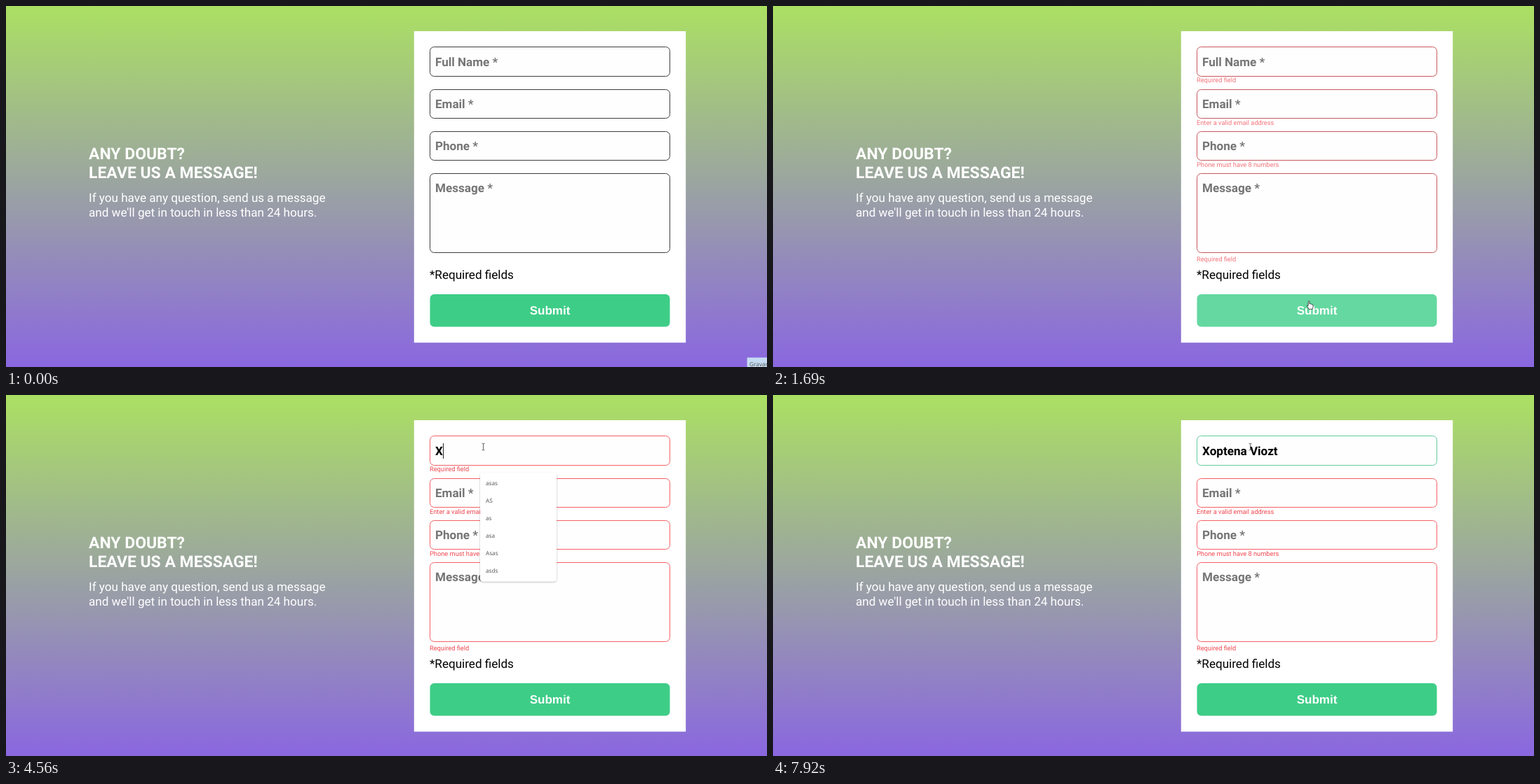
Recreate the animation shown at these times as an HTML page. Size 1085 by 516 pixels, loop 7990 ms.

```html
<!DOCTYPE html>
<html lang="en">
<head>
<meta charset="utf-8">
<title>Contact form</title>
<style>
  html, body { margin: 0; width: 100%; height: 100%; overflow: hidden; }
  svg { display: block; width: 100vw; height: 100vh; }
  text { font-family: Roboto, sans-serif; font-size: 17.08px; white-space: pre; text-rendering: geometricPrecision; }
  .bold { font-weight: 700; }
  .title { font-weight: 700; font-size: 22.95px; fill: #fff; }
  .lead { fill: #fff; }
  .hint { font-weight: 700; fill: #757575; }
  .error { font-size: 9.25px; fill: #f0464f; }
  .submit { font: 700 17px "Liberation Sans", Arial, sans-serif; fill: #fff; text-anchor: middle; }
  .option { font: 8.2px "Open Sans", sans-serif; fill: #505050; }
  .tip { font: 8.3px "Open Sans", sans-serif; fill: #555; }
</style>
</head>
<body>
<svg id="stage" viewBox="0 0 1085 516" preserveAspectRatio="none">
  <defs>
    <linearGradient id="sky" x2="0" y2="1">
      <stop stop-color="#abe063"/>
      <stop offset="1" stop-color="#8a67e0"/>
    </linearGradient>
    <filter id="soft" x="-10%" y="-10%" width="120%" height="120%">
      <feDropShadow dx="0" dy="1" stdDeviation="1.2" flood-opacity=".3"/>
    </filter>
  </defs>
  <rect width="1085" height="516" fill="url(#sky)"/>
  <rect x="581.8" y="36" width="387.4" height="445.2" fill="#fff"/>
</svg>
<script>
const LOOP = 7990;
const NAME = 'Xoptena Viozt';
const KEY_TIMES = [4560, 4950, 5150, 5340, 5550, 5870, 6070, 6200, 6530, 6800, 6930, 7070, 7400];
const DARK = [62, 62, 68], RED = [245, 96, 102], GREEN = [98, 203, 158];
const BUTTON = [62, 205, 135], HOVER = [100, 216, 160];

// Pointer hot spot: time, x, y
const PATH = [
  [670, 988, 512], [800, 925, 480], [930, 850, 457], [1090, 801, 448], [1130, 797.5, 443.5],
  [1540, 797.5, 443.5], [1700, 762, 420], [1800, 733, 405], [1950, 691, 384], [2280, 690, 372],
  [2340, 686, 355], [2550, 655, 243], [2750, 684, 183], [3120, 682, 106], [3350, 680.5, 74]
];

const stage = document.getElementById('stage');

function add(tag, attrs, parent = stage) {
  const el = document.createElementNS('http://www.w3.org/2000/svg', tag);
  for (const key in attrs) el.setAttribute(key, attrs[key]);
  parent.append(el);
  return el;
}

function label(text, x, y, cls, parent) {
  const el = add('text', { x, y, class: cls }, parent);
  el.textContent = text;
  return el;
}

const set = (el, key, value) => el.setAttribute(key, value);
const show = (el, on) => set(el, 'opacity', Number(on));
const ramp = (t, from, to) => Math.min(1, Math.max(0, (t - from) / (to - from)));
const mix = (a, b, k) => `rgb(${a.map((v, i) => Math.round(v + (b[i] - v) * k))})`;

label('ANY DOUBT?', 118, 219, 'title');
label('LEAVE US A MESSAGE!', 118, 246, 'title');
label('If you have any question, send us a message', 118, 280, 'lead');
label("and we'll get in touch in less than 24 hours.", 118, 301.3, 'lead');

const fields = [
  ['Full Name *', 58.5, 42, 'Required field', 109.3],
  ['Email *', 119.5, 41, 'Enter a valid email address', 170],
  ['Phone *', 179.5, 41, 'Phone must have 8 numbers', 229.5],
  ['Message *', 239.5, 113, 'Required field', 364.5]
].map(([hint, y, height, error, errorY], i) => ({
  y, height,
  box: add('rect', { x: 604.5, y, width: 342, height, rx: 6, fill: '#fefefe' }),
  hint: label(hint, 612, 86 + i * 60, 'hint'),
  error: label(error, 604, errorY, 'error')
}));

label('*Required fields', 604, 390, '');
const button = add('rect', { x: 604.5, y: 412, width: 342, height: 46.5, rx: 6 });
label('Submit', 775.5, 441, 'submit');

const typed = label('', 612, 86, 'bold');
const caret = add('rect', { y: 69, width: 1, height: 22, fill: '#222' });

const menu = add('g', {});
add('rect', { x: 676, y: 111, width: 109, height: 155.5, rx: 4, fill: '#fff', filter: 'url(#soft)' }, menu);
['asas', 'AS', 'as', 'asa', 'Asas', 'asds'].forEach((word, i) =>
  label(word, 684, 128.5 + i * 25.1, 'option', menu));

const glow = add('circle', { r: 8.6, fill: '#f8f23c' });
const pointer = add('g', {});
const outline = { fill: '#fff', stroke: '#222', 'stroke-width': .8, 'stroke-linejoin': 'round' };
const shapes = {
  arrow: add('path', { d: 'M0 0V11L2.6 8.7L4.3 12.3L6 11.5L4.4 8H8Z', ...outline }, pointer),
  hand: add('path', {
    d: 'M-.9 .8Q0 -.8 .9 .8V4.4Q2 3.8 2.8 4.8Q3.8 4.4 4.4 5.3Q6 5 6 6.6V9Q6 10.4 5 12H0Q-1 9.7 -2.8 7.6Q-3 6 -.9 7.2Z',
    ...outline
  }, pointer),
  beam: add('path', { d: 'M-2 -4.7H-.5L0 -4.3L.5 -4.7H2M0 -4.3V4.3M-2 4.7H-.5L0 4.3L.5 4.7H2', fill: 'none', stroke: '#555', 'stroke-width': .9 }, pointer)
};

const tip = add('g', {});
add('rect', { x: 1056.6, y: 502.5, width: 29, height: 14, fill: '#c5dcf3' }, tip);
label('Gravar', 1060, 515, 'tip', tip);

const ruler = document.createElement('canvas').getContext('2d');
ruler.font = '700 17.08px Roboto, sans-serif';

function pointerAt(t) {
  const next = PATH.findIndex(p => p[0] > t);
  if (next < 0) return PATH[PATH.length - 1].slice(1);
  if (next === 0) return PATH[0].slice(1);
  const a = PATH[next - 1], b = PATH[next];
  const k = ramp(t, a[0], b[0]);
  return [a[1] + (b[1] - a[1]) * k, a[2] + (b[2] - a[2]) * k];
}

function shapeAt(x, y) {
  if (x > 604 && x < 947 && y > 412 && y < 459) return 'hand';
  const overText = x < 724 && y > 372 && y < 395;
  const overField = fields.some(f => y > f.y && y < f.y + f.height);
  return overText || overField ? 'beam' : 'arrow';
}

function caretOn(t, lastKey) {
  const since = t - lastKey;
  return since >= 0 && since % 1040 < 520;
}

function draw(t) {
  show(tip, t < 70 ? 1 : t < 140 ? .45 : 0);

  const hover = ramp(t, 890, 1050) * (1 - ramp(t, 1720, 1880));
  set(button, 'fill', mix(BUTTON, HOVER, hover));

  const invalid = ramp(t, 1540, 1740);
  const valid = ramp(t, 4560, 4760);
  fields.forEach((f, i) => {
    const ok = i === 0 && t >= 4560;
    set(f.box, 'stroke', ok ? mix(RED, GREEN, valid) : mix(DARK, RED, invalid));
    show(f.error, ok ? 1 - valid : invalid);
  });

  const count = KEY_TIMES.filter(k => k <= t).length;
  const text = NAME.slice(0, count);
  typed.textContent = text;
  show(fields[0].hint, count === 0);
  set(caret, 'x', 612 + Math.round(ruler.measureText(text).width));
  show(caret, caretOn(t, count ? KEY_TIMES[count - 1] : 3470));

  show(menu, ramp(t, 3620, 3810) * (1 - ramp(t, 4930, 5150)));

  const [x, y] = pointerAt(t);
  const shape = shapeAt(x, y);
  set(pointer, 'transform', `translate(${x} ${y})`);
  show(pointer, t >= 670);
  for (const key in shapes) show(shapes[key], key === shape);

  set(glow, 'cx', x - .8);
  set(glow, 'cy', y - .8);
  const pressed = (t >= 1400 && t < 1540) || (t >= 3400 && t < 3600);
  show(glow, pressed ? .8 : 0);
}

const start = performance.now();
function tick() {
  draw((performance.now() - start) % LOOP);
  requestAnimationFrame(tick);
}
tick();
</script>
</body>
</html>
```
